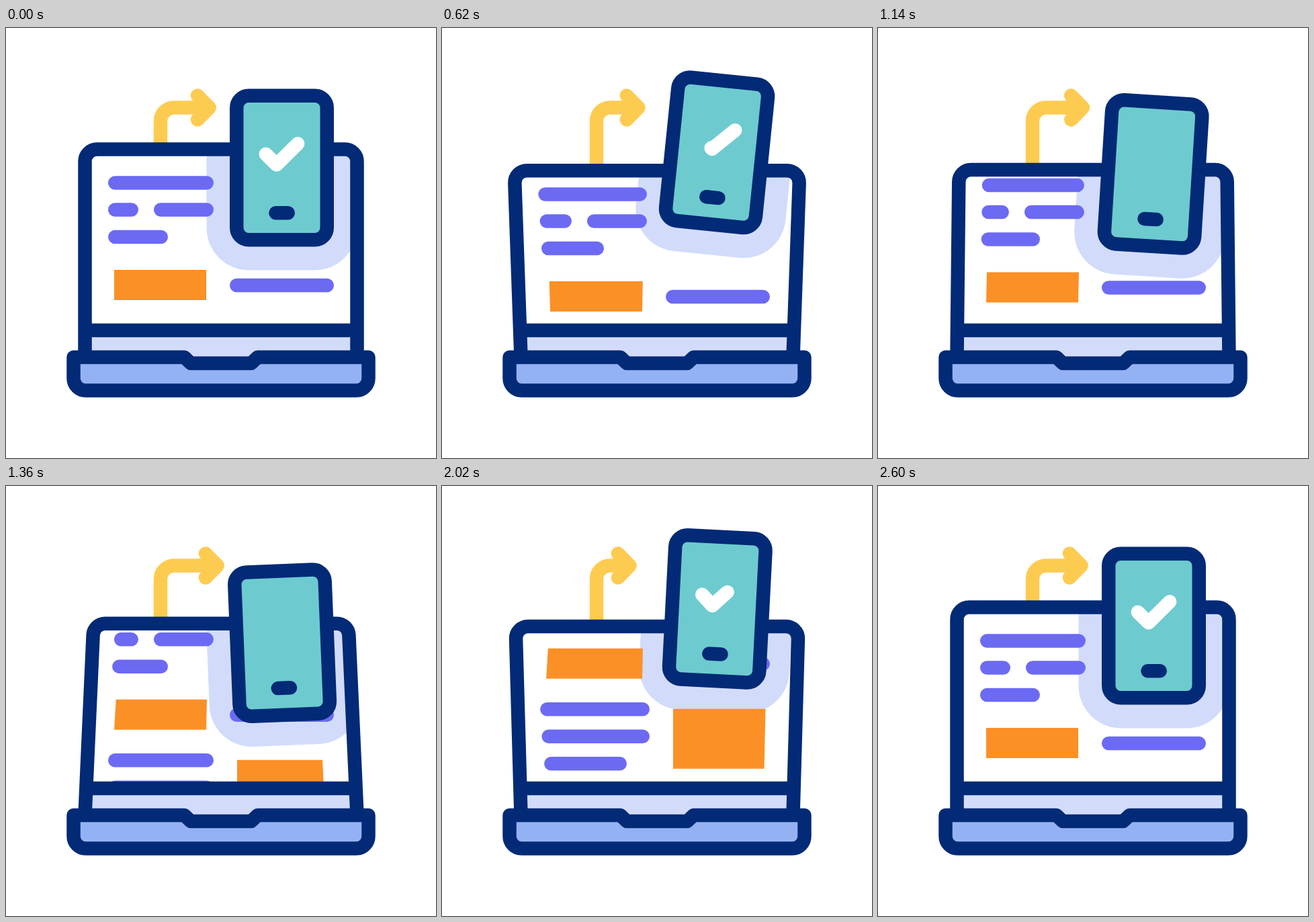
These frames come from a looping animation (640 px wide and 640 px high, 3 s). An HTML page with a canvas:

```html
<!DOCTYPE html>
<html lang="en">
<head>
<meta charset="utf-8">
<title>Laptop to phone transfer</title>
<style>
  html, body { margin: 0; width: 100%; height: 100%; overflow: hidden; background: #fff; }
  canvas { display: block; width: 640px; height: 640px; }
</style>
</head>
<body>
<canvas id="stage" width="640" height="640"></canvas>
<script>
const ctx = document.getElementById('stage').getContext('2d');
const LOOP = 3000;
const LINE = 20.5;
const NAVY = '#022a76', TEAL = '#6dcbcf', YELLOW = '#fecb51', ORANGE = '#fb9026',
      PURPLE = '#6c6af3', PALE = '#d2dcfa', BLUE = '#94b2f3', WHITE = '#fff';

// Smoothstep from 0 to 1 between two times.
function step(t, from, to) {
  const p = Math.min(1, Math.max(0, (t - from) / (to - from)));
  return p * p * (3 - 2 * p);
}

// Moves from rest through a, b and c, back to rest at the last time.
function swing(t, a, b, c, [t0, t1, t2, t3, t4] = [200, 800, 1400, 2000, 2600]) {
  return a * step(t, t0, t1) + (b - a) * step(t, t1, t2)
       + (c - b) * step(t, t2, t3) - c * step(t, t3, t4);
}

function stroke(color) {
  ctx.strokeStyle = color;
  ctx.stroke();
}

function fill(color) {
  ctx.fillStyle = color;
  ctx.fill();
}

function trace(...points) {
  ctx.beginPath();
  points.forEach(([x, y]) => ctx.lineTo(x, y));
}

function box(x, y, w, h, r) {
  ctx.beginPath();
  ctx.roundRect(x, y, w, h, r);
}

function bar(x1, x2, y, color) {
  trace([x1 + LINE / 2, y], [x2 - LINE / 2, y]);
  stroke(color);
}

function drawArrow(t) {
  const dx = swing(t, -13, 12.3, -23.2);
  ctx.beginPath();
  ctx.moveTo(230, 225);
  ctx.arcTo(230, 118.5, 250, 118.5, 20);
  ctx.lineTo(300 + dx, 118.5);
  stroke(YELLOW);
  trace([285 + dx, 100.5], [302.7 + dx, 118.5], [285 + dx, 136.5]);
  stroke(YELLOW);
}

const lidLean = t => swing(t, 12.5, -13.2, 8);

function lidPath(t, bottom) {
  const top = 180.5 + swing(t, 40.3, 24, 28.5);
  const lean = lidLean(t);
  const foot = lean * (490 - bottom) / (490 - top);
  const l = 117.5 - lean, r = 522.5 + lean;
  ctx.beginPath();
  ctx.moveTo(117.5 - foot, bottom);
  ctx.arcTo(l, top, r, top, 18);
  ctx.arcTo(r, top, 522.5 + foot, bottom, 18);
  ctx.lineTo(522.5 + foot, bottom);
}

// The left margin follows the tilting lid, more so near its top.
function margin(t, y) {
  return swing(t, 0.073 * Math.min(0, y - 382), 0.07 * Math.max(0, 400 - y),
               -6.3 * Math.sin(Math.PI * (y - 325) / 206));
}

function drawContent(t) {
  const leftLine = (y, x2, dx = 0) => bar(152 + margin(t, y), x2 + dx, y, PURPLE);
  const nudge = swing(t, -5.2, 0, 0);
  const lean = lidLean(t);
  ctx.save();
  ctx.translate(0, 26 * step(t, 200, 900) - 154.5 * step(t, 900, 1900)
                   + 128.5 * step(t, 1900, 2600));
  leftLine(230.5, 309, nudge);
  leftLine(270.5, 197, nudge);
  bar(220 + nudge, 309 + nudge, 270.5, PURPLE);
  leftLine(311, 241);
  bar(333, 488, 383, PURPLE);
  leftLine(450.5, 309);
  leftLine(491, 309);
  leftLine(531.5, 275);
  trace([161 + margin(t, 360), 360], [298 + step(t, 200, 800) - step(t, 2000, 2600), 360],
        [298, 405], [161 + margin(t, 405), 405]);
  fill(ORANGE);
  trace([344, 450], [477.5 + lean * 0.5, 450], [478 + lean * 0.2, 539], [344, 539]);
  fill(ORANGE);
  ctx.restore();
}

function drawLid(t) {
  lidPath(t, 490);
  fill(PALE);
  ctx.save();
  lidPath(t, 450);
  fill(WHITE);
  ctx.clip();
  ctx.save();
  movePhone(t);
  box(298.5, 56, 224, 304.5, 63);
  fill(PALE);
  ctx.restore();
  drawContent(t);
  ctx.restore();
  trace([124, 450], [516, 450]);
  stroke(NAVY);
  lidPath(t, 490);
  stroke(NAVY);
}

function drawBase() {
  trace([100.5, 490], [265.5, 490], [275, 499], [365, 499], [374.5, 490], [539.5, 490]);
  ctx.arcTo(539.5, 539.5, 500, 539.5, 18);
  ctx.arcTo(100.5, 539.5, 100.5, 500, 18);
  ctx.closePath();
  fill(BLUE);
  stroke(NAVY);
}

function movePhone(t) {
  const dy = swing(t, -27, 25.6, -26.5, [200, 765, 1360, 1940, 2520]);
  const turn = swing(t, 8.3, -4.7, 3.4, [200, 860, 1550, 2100, 2600]);
  ctx.translate(410.5, 194 + dy);
  ctx.rotate(turn * Math.PI / 180);
  ctx.translate(-410.5, -194);
}

// The tick wipes off from its start, then is drawn again.
function drawCheck(t) {
  const length = 66.8;
  const redraw = t > 1300;
  const from = redraw ? 0 : step(t, 400, 1000) * length;
  const to = redraw ? step(t, 1600, 2200) * length : length;
  if (to - from < 0.1) return;
  ctx.save();
  ctx.setLineDash([to - from + (to === length ? 1 : 0), 999]);
  ctx.lineDashOffset = -from;
  trace([386.8, 187.8], [402.7, 203.5], [434.2, 172.3]);
  stroke(WHITE);
  ctx.restore();
}

function drawPhone(t) {
  ctx.save();
  movePhone(t);
  box(343.25, 100.75, 134.5, 214.5, 18);
  fill(TEAL);
  stroke(NAVY);
  bar(391.2, 430, 275.2, NAVY);
  drawCheck(t);
  ctx.restore();
}

function draw(t) {
  ctx.clearRect(0, 0, 640, 640);
  drawArrow(t);
  drawLid(t);
  drawBase();
  drawPhone(t);
}

ctx.lineCap = ctx.lineJoin = 'round';
ctx.lineWidth = LINE;
const start = performance.now();
function tick() {
  draw((performance.now() - start) % LOOP);
  requestAnimationFrame(tick);
}
tick();
</script>
</body>
</html>
```
